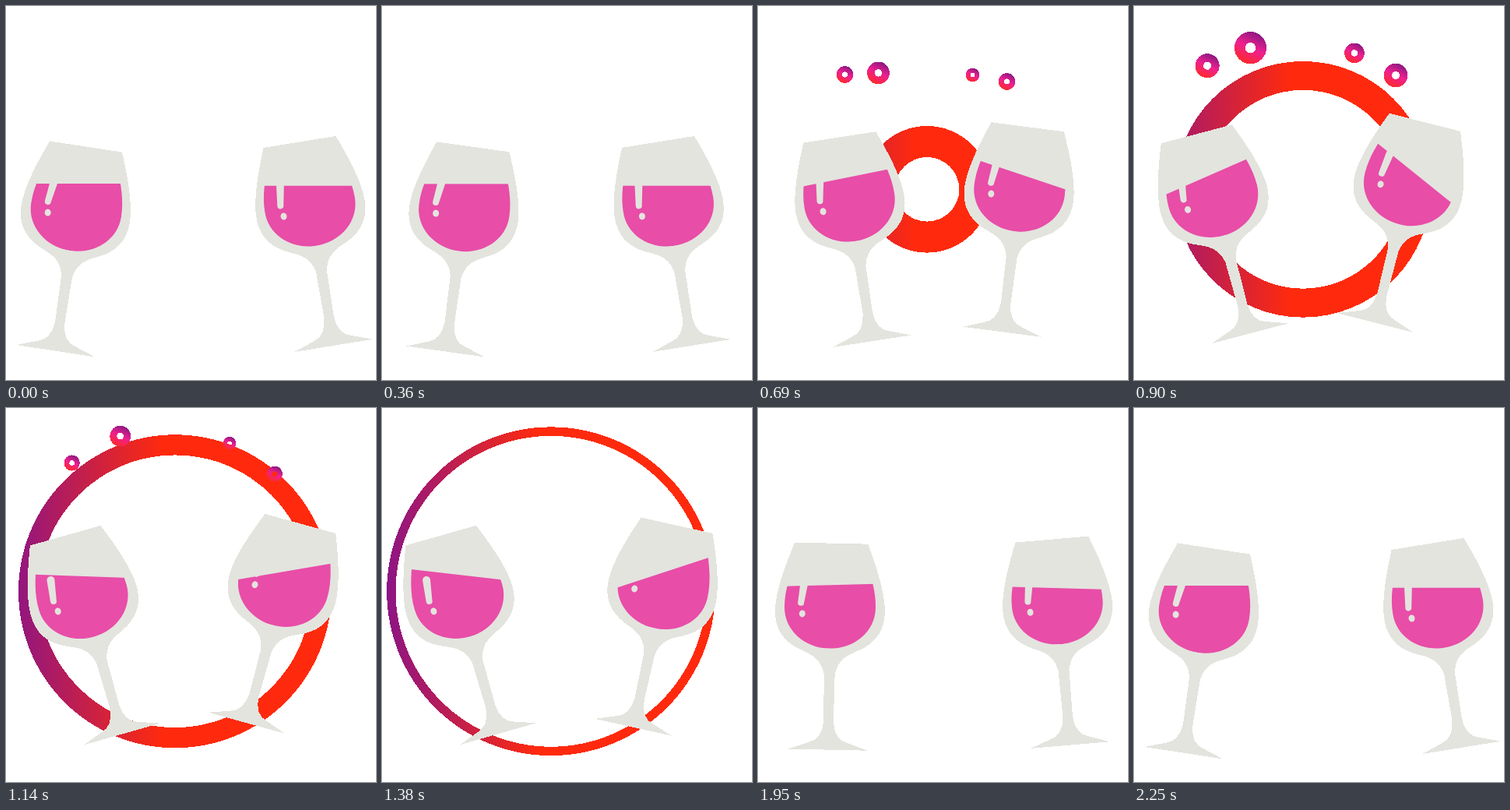
Write an HTML page that moves like this. It is 475 by 480 pixels and loops after 2.31 s.

```html
<!DOCTYPE html>
<html lang="en">
<head>
<meta charset="utf-8">
<title>Cheers</title>
<style>
  html, body { margin: 0; width: 100%; height: 100%; overflow: hidden; background: #fff; }
  svg { display: block; width: 100vw; height: 100vh; }
  .crisp { shape-rendering: crispEdges; }
</style>
</head>
<body>
<svg viewBox="0 0 475 480">
  <defs>
    <linearGradient id="ringFill" gradientUnits="userSpaceOnUse" x1="5" y1="0" x2="202" y2="0">
      <stop offset="0" stop-color="#8c1585"/>
      <stop offset="1" stop-color="#ff2a0d"/>
    </linearGradient>
    <linearGradient id="bubbleFill" x1=".75" y1=".02" x2=".3" y2=".98">
      <stop offset="0" stop-color="#84187f"/>
      <stop offset=".5" stop-color="#ee2090"/>
      <stop offset="1" stop-color="#ff2a28"/>
    </linearGradient>
    <clipPath id="bowl">
      <path d="M-44 20C-52 42-58.5 60-58.5 82C-58.5 113-31 135 0 135C31 135 58.5 113 58.5 82C58.5 60 52 42 44 20Z"/>
    </clipPath>
    <path id="body" class="crisp" fill="#e3e4de" d="M-47 0C-57 25-70.5 62-70.5 87C-70.5 110-60 124-45 133C-30 142-11 143-6 168L-5 228C-6 244-13 253-23 255.5L-49.5 265H52L25 255.5C15 253 8 244 7.5 228L8 168C13 143 30 142 45 133C60 124 70.5 110 70.5 87C70.5 62 57 25 47 0Z"/>
    <g id="shine" fill="#e3e4de">
      <path d="M-38.5 50A5 5 0 0 1-28.5 50L-33.5 77A4 4 0 0 1-41.5 77Z"/>
      <ellipse cx="-35.5" cy="91" rx="4" ry="4.5"/>
    </g>
  </defs>
  <path id="ring" class="crisp" fill="url(#ringFill)" fill-rule="evenodd"/>
  <g id="bubbles" class="crisp" fill="url(#bubbleFill)" fill-rule="evenodd"></g>
  <g id="glasses"></g>
</svg>
<script>
const LOOP = 2310, STEP = 30, CLINK = 565, REST = 2250;
const PIVOT = 90; // bowl centre, measured down from the rim
const NS = 'http://www.w3.org/2000/svg';
const $ = id => document.getElementById(id);

function add(parent, tag, attrs = {}) {
  const el = document.createElementNS(NS, tag);
  for (const k in attrs) el.setAttribute(k, attrs[k]);
  return parent.appendChild(el);
}

const clamp = u => Math.min(1, Math.max(0, u));
const mix = (a, b, u) => a.map((v, i) => v + (b[i] - v) * u);
const decay = (t, start, span) => Math.exp(-Math.max(0, t - start) / span);
function smooth(t, from, to) {
  const u = clamp((t - from) / (to - from));
  return u * u * (3 - 2 * u);
}

// Bowl centre and tilt: speed up to the clink, bounce off, drift home
function poseAt(t, { home, hit, far, turn }) {
  if (t < CLINK) return mix(home, hit, (t / CLINK) ** 3.2);
  const bounced = mix(far, hit, decay(t, CLINK, 115));
  return mix(bounced, home, smooth(t, turn, REST));
}

// Wine surface: a fading swing that starts a little after the clink
function wineAt(t, { depth, swing, drag, home }, tilt) {
  const late = Math.max(0, t - 640);
  const wave = Math.sin(late * Math.PI / 450);
  const calm = 1 - smooth(t, 1740, REST);
  const kick = 1 - decay(t, CLINK, 115);
  return {
    level: calm * (swing * wave * Math.exp(-late / 700) + drag * kick * (tilt - home[2])),
    depth: depth + calm * kick * (7 + 6 * wave * late / 1100)
  };
}

function makeGlass(spec) {
  const g = add($('glasses'), 'g');
  add(g, 'use', { href: '#body' });
  const inside = add(g, 'g', { 'clip-path': 'url(#bowl)' });
  const wine = add(inside, 'rect', { x: -250, y: 0, width: 500, height: 400, fill: '#e84da8' });
  add(inside, 'use', { href: '#shine' });
  return t => {
    const [x, y, tilt] = poseAt(t, spec);
    const { level, depth } = wineAt(t, spec, tilt);
    g.setAttribute('transform', `translate(${x} ${y}) rotate(${tilt}) translate(0 ${-PIVOT})`);
    wine.setAttribute('transform', `translate(0 ${depth}) rotate(${level - tilt})`);
  };
}

const glasses = [
  { home: [88.9, 269.5, 8.7], hit: [154.6, 271.5, 5.3], far: [100.2, 250.2, -15.9],
    turn: 1430, depth: 48, swing: -31, drag: .13 },
  { home: [391.4, 263.3, -9.2], hit: [295.8, 263.2, -8.8], far: [354.4, 235, 15.6],
    turn: 1130, depth: 57, swing: 58, drag: 0 }
].map(makeGlass);

const circle = (x, y, r) => `M${x - r} ${y}a${r} ${r} 0 1 0 ${2 * r} 0a${r} ${r} 0 1 0 ${-2 * r} 0Z`;
const donut = (x, y, outer, inner) =>
  outer > 0 ? circle(x, y, outer) + (inner > 0 ? circle(x, y, inner) : '') : '';

function drawRing(t) {
  const r = 217 * (1 - decay(t, 601, 268));
  const half = 20 * (1 - clamp((t - 640) / 1250) ** 2.5) ** 4;
  $('ring').setAttribute('d', r > 0 && half > 0 ? donut(217, 235.3, r + half, r - half) : '');
}

// Start x, y, travel x, y, full radius
const bubbles = [
  [126, 97.5, -49, -32, 15.5],
  [158.6, 112.8, -14, -91, 20.6],
  [269.3, 111.8, 21, -79, 12.8],
  [305.8, 103.6, 46.5, -22.5, 15.4]
].map(spec => ({ spec, el: add($('bubbles'), 'path') }));

function drawBubbles(t) {
  const go = 1 - decay(t, 585, 300);
  const size = Math.sqrt(Math.max(0, Math.sin(Math.PI * clamp((t - 585) / 645))));
  for (const { spec: [x, y, dx, dy, full], el } of bubbles) {
    const r = size > .01 ? full * size : 0;
    el.setAttribute('d', donut(x + dx * go, y + dy * go, r, r * .33));
  }
}

function draw(t) {
  glasses.forEach(pose => pose(t));
  drawRing(t);
  drawBubbles(t);
}

const start = performance.now();
function tick() {
  const t = (performance.now() - start) % LOOP;
  draw(Math.min(REST, Math.floor(t / STEP) * STEP));
  requestAnimationFrame(tick);
}
tick();
</script>
</body>
</html>
```
